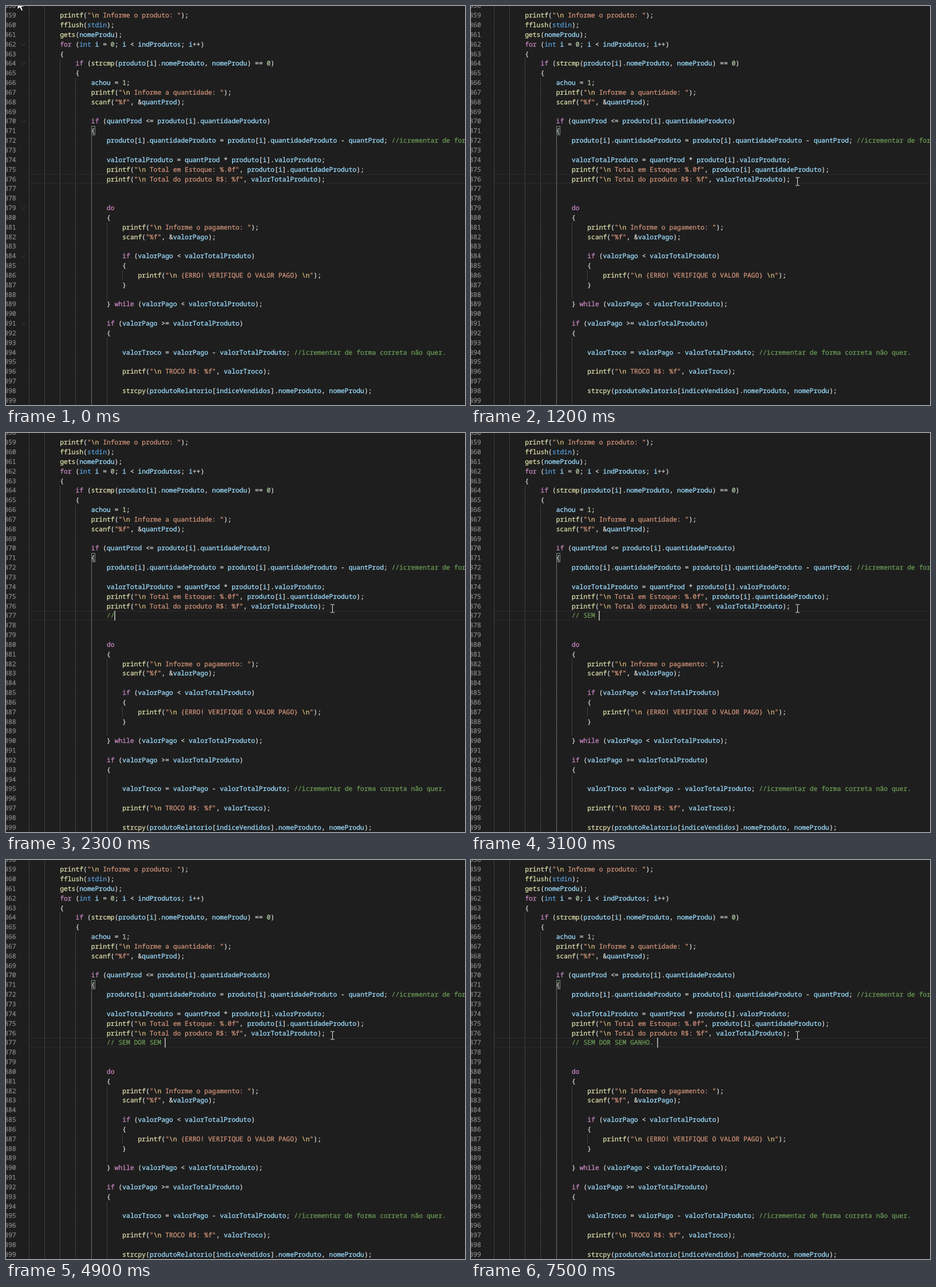
An HTML page that plays this animation: 802x698 px, repeating every 8000 ms.

```html
<!DOCTYPE html>
<html lang="pt">
<head>
<meta charset="utf-8">
<title>Editor</title>
<style>
html, body { margin: 0; width: 100%; height: 100%; overflow: hidden; background: #1e1e1e; }
svg { display: block; }
text { font: 11.363px "Noto Sans Mono", "DejaVu Sans Mono", monospace; text-rendering: geometricPrecision; white-space: pre; }
text, tspan { fill: currentColor; stroke: currentColor; stroke-width: .3px; }
</style>
</head>
<body>
<svg id="stage" width="802" height="698" viewBox="0 0 802 698"></svg>
<script>
const LOOP = 8000, CHAR = 6.82, ROW = 16.84, LEFT = 39.6, TOP = -9, FIRST = 358;
const BREAK_AT = 1300, NEW_ROW = 19;
const stage = document.getElementById('stage');

// Blank rows carry their indent as spaces, which sets their guides.
const blank = n => ' '.repeat(n);
const code = [
  blank(8),
  String.raw`        printf("\n Informe o produto: ");`,
  '        fflush(stdin);',
  '        gets(nomeProdu);',
  '        for (int i = 0; i < indProdutos; i++)',
  '        {',
  '            if (strcmp(produto[i].nomeProduto, nomeProdu) == 0)',
  '            {',
  '                achou = 1;',
  String.raw`                printf("\n Informe a quantidade: ");`,
  '                scanf("%f", &quantProd);',
  blank(16),
  '                if (quantProd <= produto[i].quantidadeProduto)',
  '                {',
  '                    produto[i].quantidadeProduto = produto[i].quantidadeProduto - quantProd; //icrementar de forma correta não quer.',
  blank(20),
  '                    valorTotalProduto = quantProd * produto[i].valorProduto;',
  String.raw`                    printf("\n Total em Estoque: %.0f", produto[i].quantidadeProduto);`,
  String.raw`                    printf("\n Total do produto R$: %f", valorTotalProduto);`,
  blank(20),
  blank(20),
  '                    do',
  '                    {',
  String.raw`                        printf("\n Informe o pagamento: ");`,
  '                        scanf("%f", &valorPago);',
  blank(24),
  '                        if (valorPago < valorTotalProduto)',
  '                        {',
  String.raw`                            printf("\n {ERRO! VERIFIQUE O VALOR PAGO} \n");`,
  '                        }',
  blank(24),
  '                    } while (valorPago < valorTotalProduto);',
  blank(20),
  '                    if (valorPago >= valorTotalProduto)',
  '                    {',
  blank(24),
  '                        valorTroco = valorPago - valorTotalProduto; //icrementar de forma correta não quer.',
  blank(24),
  String.raw`                        printf("\n TROCO R$: %f", valorTroco);`,
  blank(24),
  '                        strcpy(produtoRelatorio[indiceVendidos].nomeProduto, nomeProdu);',
  blank(24)
];

const phrase = '// SEM DOR SEM GANHO. ';
const keyTimes = [2200, 2300, 2600, 2800, 2900, 3100, 3100, 3200, 3400, 3500, 4300,
  4400, 4700, 4800, 4900, 5100, 5300, 5400, 5600, 6100, 6400, 6600];
const caretOff = [[0, 800], [1200, 1300], [1700, 2200], [4000, 4300], [7100, 7500]];
const pointerPath = [[20, -10], [75, 70], [205, 215], [350, 330], [475, 377], [550, 345], [571, 309], [571, 309], [570.5, 307]];

const colX = col => LEFT + col * CHAR;
const rowY = row => TOP + row * ROW;
const baseline = row => Math.round(rowY(row) + 12.4);
const escapeText = s => s.replace(/&/g, '&amp;').replace(/</g, '&lt;');
const span = (s, color) => `<tspan color="${color}">${escapeText(s)}</tspan>`;
const rect = (x, y, w, h, color) => `<rect x="${x}" y="${y}" width="${w}" height="${h}" fill="${color}"/>`;

const tokenRules = [
  [/^\/\//, '#6a9955'],
  [/^(if|for|do|while)$/, '#c586c0'],
  [/^(int|stdin)$/, '#569cd6'],
  [/^(printf|fflush|gets|strcmp|scanf|strcpy)$/, '#dcdcaa'],
  [/^[a-z]/i, '#9cdcfe'],
  [/^\d/, '#b5cea8']
];

function colorize(line) {
  return line.replace(/\/\/.*|"[^"]*"|\w+|[^\w"/]+/g, token => {
    if (token[0] === '"')
      return token.split(/(\\n)/).map(s => span(s, s === '\\n' ? '#d7ba7d' : '#ce9178')).join('');
    const rule = tokenRules.find(([pattern]) => pattern.test(token));
    return span(token, rule ? rule[1] : '#d4d4d4');
  });
}

function drawRow(line, row) {
  const indent = line.search(/\S|$/);
  let out = `<text x="17.6" y="${baseline(row)}" text-anchor="end" color="#858585">${FIRST + row}</text>`;
  for (let col = 0; col < indent; col += 4) {
    const active = col === 16 && row > 13;
    out += rect(Math.floor(40 + col * CHAR), rowY(row), 1, ROW, active ? '#707070' : '#404040');
  }
  return out + `<text x="${colX(indent)}" y="${baseline(row)}">${colorize(line.trim())}</text>`;
}

function drawChevrons(lines, opacity) {
  return lines.map((line, row) => /^ *(if|for|do)\b/.test(line)
    ? `<path d="M26.5 ${rowY(row) + 7}l3.7 3.7l3.7-3.7" fill="none" stroke="#c5c5c5" opacity="${opacity}"/>` : '').join('');
}

function drawPointer(t) {
  const [x, y] = pointerPath[Math.min(Math.floor(t / 100), pointerPath.length - 1)];
  const shape = t < 100
    ? '<path d="M0 0V16L4 12.5L7 18.5L9.5 17.5L7 11.5H12Z" fill="#fff" stroke="#000" stroke-width=".8"/>'
    : '<path d="M-3.5-7H-1Q0-7 0-6Q0-7 1-7H3.5M0-6V6M-3.5 7H-1Q0 7 0 6Q0 7 1 7H3.5" fill="none" stroke="#e8e8e8"/>';
  return `<g transform="translate(${x} ${y})">${shape}</g>`;
}

function draw(t) {
  const broken = t >= BREAK_AT;
  const typed = keyTimes.filter(k => k <= t).length;
  const lines = broken
    ? [...code.slice(0, NEW_ROW), blank(20) + phrase.slice(0, typed), ...code.slice(NEW_ROW, -1)]
    : code;
  const row = broken ? NEW_ROW : NEW_ROW - 1;
  const col = broken ? 20 + typed : code[row].length;
  const y = Math.round(rowY(row));

  let out = rect(41, y, 761, 1.4, '#282828') + rect(41, y + 15.6, 761, 1.4, '#282828');
  out += `<rect x="149.5" y="${Math.round(rowY(13)) + .5}" width="6" height="15" fill="#1c251c" stroke="#888"/>`;
  out += lines.map(drawRow).join('');
  if (t < 500) out += drawChevrons(lines, .22 * (1 - t / 500));
  if (!caretOff.some(([from, to]) => t >= from && t < to))
    out += rect(Math.floor(colX(col) - .4) + .25, y, 1.75, 17, '#aeafad');
  stage.innerHTML = out + drawPointer(t);
}

let shown = -1;
function tick(now) {
  const t = Math.floor(now % LOOP / 100) * 100;
  if (t !== shown) draw(shown = t);
  requestAnimationFrame(tick);
}
tick(performance.now());
</script>
</body>
</html>
```
